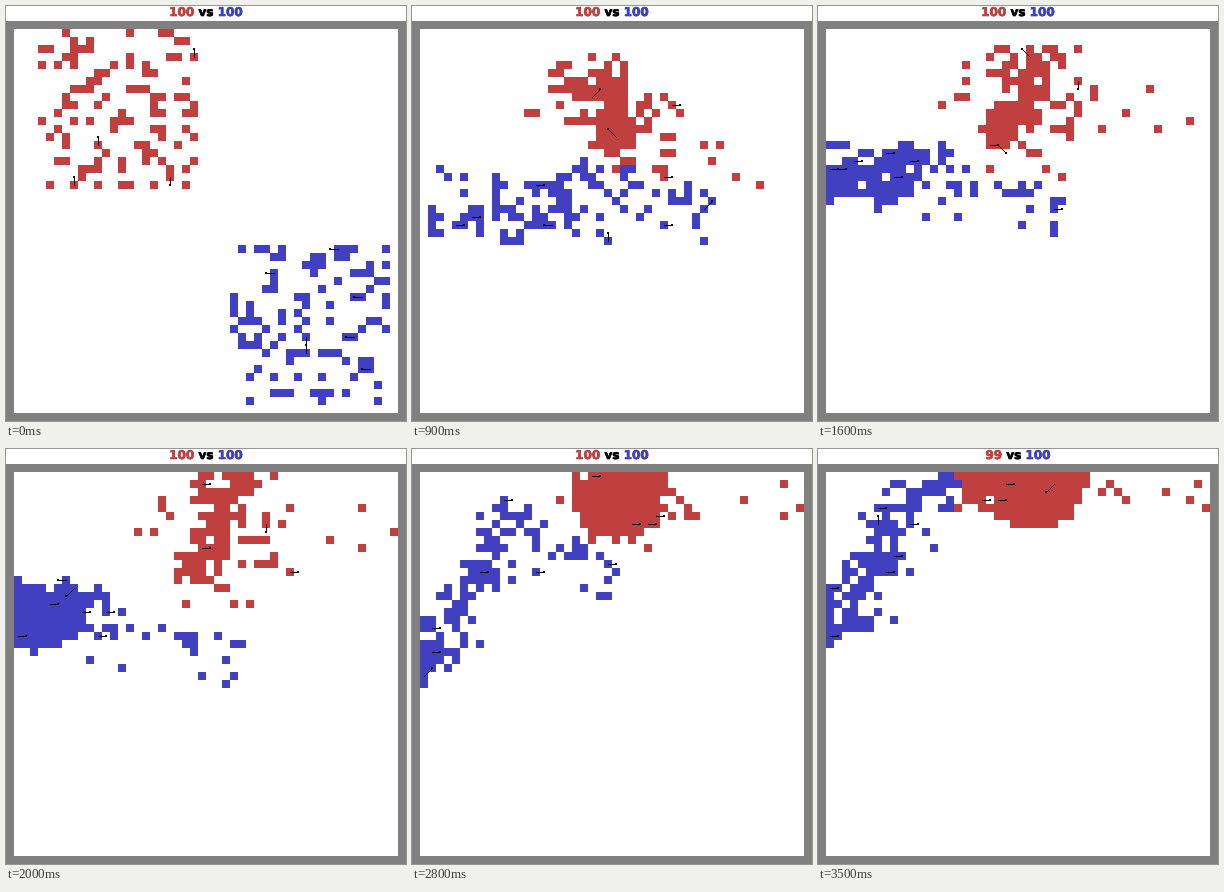
Animation of 400 by 415 pixels, one loop 3.6 s. Source, as a matplotlib script:

```python
import itertools

import matplotlib.pyplot as plt
import numpy as np
from matplotlib.animation import FuncAnimation
from matplotlib.offsetbox import AnnotationBbox, HPacker, TextArea
from matplotlib.patheffects import withStroke

W, H, DPI = 400, 415, 80
FRAMES, STEP = 36, 100
N, CELL, LEFT, TOP = 48, 8, 8, 23
SIZE, CAMP = 100, 20
RED, BLUE = (192, 64, 64), (64, 64, 192)
GREY, WHITE, BLACK = 128, 255, 0
FIRST_LOSS = 33

# Each army stretches along a line tail - bend - head; the last value is its scatter.
TIMES = (0, 5, 9, 13, 20, 28, 35)
RED_ROUTE = (
    ((13, 3), (28, 16), (28, 17), 1.8),
    ((19, 5), (28, 15), (36, 16), 2.4),
    ((23, 5), (25, 15), (36, 10), 2.8),
    ((26, 0), (25, 14), (43, 4), 2.5),
    ((25, 0), (25, 6), (46, 2), 2.0),
    ((19, 2), (29, 2), (47, 2), 1.5),
)
BLUE_ROUTE = (
    ((13, 34), (28, 34), (25, 20), 2.4),
    ((3, 23), (23, 20), (34, 23), 2.4),
    ((1, 19), (16, 17), (29, 23), 2.0),
    ((0, 18), (8, 17), (27, 24), 2.0),
    ((0, 25), (11, 5), (23, 14), 1.4),
    ((1, 20), (9, 5), (14, 1), 1.6),
)

DIRS = [d for d in itertools.product((-1, 0, 1), repeat=2) if any(d)]
NEARBY = sorted(itertools.product(range(-10, 11), repeat=2),
                key=lambda d: d[0] ** 2 + d[1] ** 2)


def march(camp, slope, bend_at, route, seed):
    """Soldier positions at every key time, ordered from tail to head."""
    rng = np.random.default_rng(seed)
    spots = rng.permutation(CAMP * CAMP)[:SIZE]
    home = np.column_stack((spots % CAMP, spots // CAMP)) + camp
    home = home[np.argsort(home @ (1, slope))]
    rank = np.linspace(0, 1, SIZE)
    drift = rng.normal(size=(SIZE, 2)) * (1.3, 0.9)
    poses = [home]
    for *line, scatter in route:
        spine = [np.interp(rank, (0, bend_at, 1), axis) for axis in zip(*line)]
        poses.append(np.column_stack(spine) + scatter * drift)
    return np.clip(poses, 0, N - 1)


def place(poses, frame, taken):
    """Cells of one army, each soldier stepping to the nearest free cell."""
    k = min(np.searchsorted(TIMES, frame, side="right") - 1, len(TIMES) - 2)
    t = (frame - TIMES[k]) / (TIMES[k + 1] - TIMES[k])
    cells = []
    for x, y in np.rint(poses[k] + t * (poses[k + 1] - poses[k])).astype(int):
        for dx, dy in NEARBY:
            c = (x + dx, y + dy)
            if c not in taken and 0 <= c[0] < N and 0 <= c[1] < N:
                break
        taken.add(c)
        cells.append(c)
    return cells


def strike(img, cell, d):
    x, y = LEFT + CELL * cell[0] + 4, TOP + CELL * cell[1] + 4
    for s in range(CELL + 1):
        img[y + s * d[1], x + s * d[0]] = BLACK
    x, y = x + CELL * d[0], y + CELL * d[1]
    img[y - 1:y + 1, x - 1:x + 1] = BLACK


def attacks(img, cells, count, main, rng):
    for i in rng.permutation(len(cells))[:count]:
        d = main if rng.random() < 0.7 else DIRS[rng.integers(len(DIRS))]
        if all(0 <= c + s < N for c, s in zip(cells[i], d)):
            strike(img, cells[i], d)


def render(frame):
    img = np.full((H, W, 3), WHITE, np.uint8)
    img[15:] = GREY
    img[TOP:TOP + N * CELL, LEFT:LEFT + N * CELL] = WHITE
    taken = set()
    reds, blues = place(red, frame, taken), place(blue, frame, taken)
    if frame >= FIRST_LOSS:
        reds.pop(0)
    for cells, color in ((reds, RED), (blues, BLUE)):
        for x, y in cells:
            px, py = LEFT + CELL * x, TOP + CELL * y
            img[py:py + CELL, px:px + CELL] = color
    rng = np.random.default_rng(100 + frame)
    early = frame < 7
    attacks(img, reds, 4, (0, -1) if early else (1, 0), rng)
    attacks(img, blues, 7, (-1, 0) if early else (1, 0), rng)
    return img, len(reds), len(blues)


red = march((3, 0), 1, 0.92, RED_ROUTE, 4)
blue = march((27, 27), -1, 0.75, BLUE_ROUTE, 9)

fig = plt.figure(figsize=(W / DPI, H / DPI), dpi=DPI)
ax = fig.add_axes((0, 0, 1, 1))
ax.axis("off")
view = ax.imshow(np.zeros((H, W, 3), np.uint8), extent=(0, W, H, 0),
                 interpolation="nearest", aspect="auto")


def label(text, color):
    color = np.array(color) / 255
    heavy = [withStroke(linewidth=0.6, foreground=color)]
    return TextArea(text, textprops=dict(color=color, size=12 * 72 / DPI, weight="bold",
                                         family="DejaVu Sans", path_effects=heavy))


red_score, blue_score = label("100", RED), label("100", BLUE)
title = HPacker(children=[red_score, label("vs", (0, 0, 0)), blue_score],
                align="baseline", pad=0, sep=3.75)
ax.add_artist(AnnotationBbox(title, (W / 2, 6.5), frameon=False, pad=0))


def draw(frame):
    img, n_red, n_blue = render(frame)
    view.set_data(img)
    red_score.set_text(str(n_red))
    blue_score.set_text(str(n_blue))
    return view, title


anim = FuncAnimation(fig, draw, frames=FRAMES, interval=STEP, repeat=True,
                     repeat_delay=0, blit=False)
plt.show()
```
